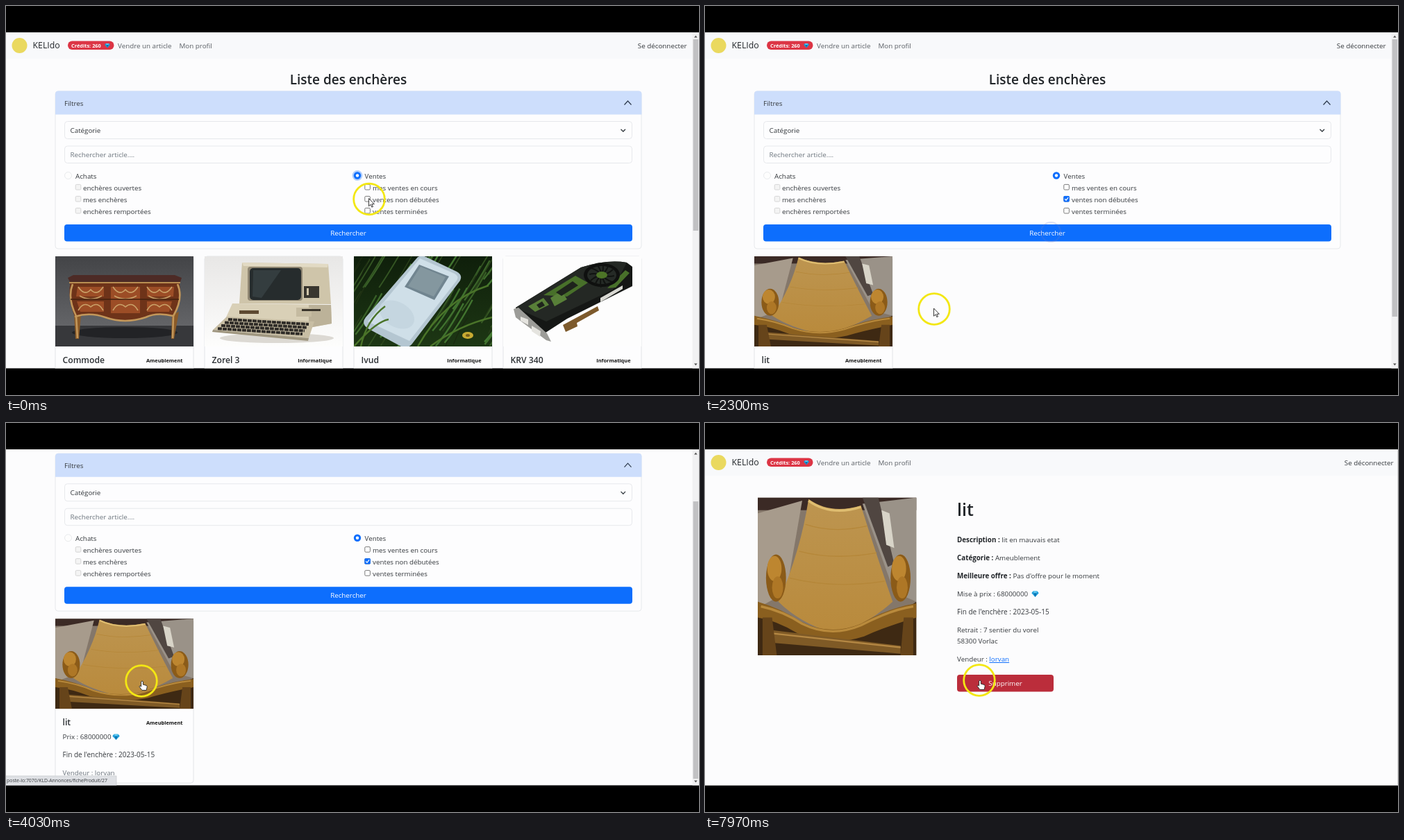
An HTML page for the animation above (8 s loop, 998 by 561 pixels).

```html
<!DOCTYPE html>
<html lang="fr">
<head>
<meta charset="utf-8">
<title>Liste des enchères</title>
<style>
html, body { margin: 0; width: 100%; height: 100%; overflow: hidden; background: #000; }
svg { display: block; }
#stage { width: 100vw; height: 100vh; }
text { font: 9.8px "Open Sans", "Noto Sans", sans-serif; fill: #35393d; white-space: pre; }
.h { font-weight: 600; fill: #212529; }
.t { font-size: 12.2px; font-weight: 600; fill: #2b2f33; }
.tag { font-size: 7.4px; font-weight: 700; fill: #111; text-anchor: end; }
.mute { fill: #6c757d; }
.mid { fill: #fff; text-anchor: middle; }
.b { font-weight: 700; fill: #212529; }
</style>
</head>
<body>
<svg id="stage" viewBox="0 0 998 561"></svg>
<script>
const LOOP = 8000;
const T = { check: 900, search: 1800, results: 2000, open: 4250, detail: 4550 };

const text = (x, y, s, cls = '', extra = '') => `<text x="${x}" y="${y}" class="${cls}" ${extra}>${s}</text>`;
const rect = (x, y, w, h, fill, extra = '') => `<rect x="${x}" y="${y}" width="${w}" height="${h}" fill="${fill}" ${extra}/>`;
const path = (d, fill, extra = '') => `<path d="${d}" fill="${fill}" ${extra}/>`;
const line = (d, color, w, extra = '') => path(d, 'none', `stroke="${color}" stroke-width="${w}" ${extra}`);
const oval = (x, y, rx, ry, fill, extra = '') => `<ellipse cx="${x}" cy="${y}" rx="${rx}" ry="${ry}" fill="${fill}" ${extra}/>`;
const fade = (id, a, b) => `<linearGradient id="${id}" x2="0" y2="1"><stop stop-color="${a}"/><stop offset="1" stop-color="${b}"/></linearGradient>`;
const pic = (x, y, w, h, box, body) =>
  `<svg x="${x}" y="${y}" width="${w}" height="${h}" viewBox="0 0 ${box}" preserveAspectRatio="none">${body}</svg>`;
const gem = (x, y, k = 1) => `<g transform="translate(${x} ${y}) scale(${k})">` +
  path('M-3-4H3L5.2-1.2 0 4.4-5.2-1.2Z', '#1b9bd8') + path('M-2-1.2H2L0 4.4Z', '#0b6fae') +
  path('M-3-4H3L2-1.2H-2Z', '#5cc6ee') + '</g>';

let seed = 7;
const rnd = () => (seed = seed * 16807 % 2147483647) / 2147483647;

// Pictures
function chest() {
  let s = rect(0, 0, 199, 130, 'url(#studio)') + rect(0, 100, 199, 30, '#37383b');
  s += oval(100, 110, 76, 8, '#222326');
  s += path('M27 82 29 119H34L37 84ZM168 84 167 119H171L178 80Z', '#8a5a28');
  s += path('M22 36H178Q184 58 170 86Q142 80 130 87Q100 97 72 87Q50 81 28 87Q17 60 22 36Z', '#6e3319');
  s += path('M32 44H70V58H30ZM132 44H171L170 58H132ZM80 44H122V82H80ZM31 65H70V80H36ZM132 65H168L164 80H132Z', '#9c4d26');
  s += path('M18 31 26 27H172L182 31 180 37H21Z', '#4d2b26') + line('M20 38H180', '#b98e52', 2);
  s += line('M25 40Q17 60 30 86L32 118M176 40Q185 60 170 86L169 118M28 87Q50 80 72 88Q100 98 130 88Q146 80 170 86', '#c3975a', 2.6);
  for (const x of [51, 101, 150])
    s += line(`M${x - 18} 44q9 14 18 4q9 10 18-4M${x - 18} 78q8-14 18-5q10-9 18 5M${x - 16} 57q16 9 32 0`, '#c9a168', 1.6);
  return s + line('M22 62H178', '#41200f', 1.4);
}

function computer() {
  let s = rect(0, 0, 199, 130, 'url(#wall)');
  s += oval(104, 118, 82, 7, '#dcd9d3');
  s += path('M54 9 178 11 182 69 50 68Z', '#cfc5aa') + path('M54 9 178 11 177 16 56 14Z', '#e2dac4');
  s += rect(62, 15, 79, 49, '#8f8672', 'rx="4"') + rect(65, 17, 74, 46, '#262c2d', 'rx="5"');
  s += path('M70 20 110 20 82 60 69 58Z', '#343d3f') + rect(143, 43, 22, 17, '#39362f') + rect(147, 46, 3, 10, '#cfc5aa');
  s += path('M40 68 182 70 183 97 146 104 30 90Z', '#d9d0b7') + path('M150 70 182 70 183 97 150 103Z', '#bcb299');
  s += rect(132, 74, 22, 13, '#c5bba1') + rect(140, 76, 27, 3, '#3a352b') + rect(50, 78, 28, 5, '#5d4931');
  s += path('M32 87 158 94 150 118 12 106Z', '#c8bea4') + path('M12 106 150 118 149 122 11 109Z', '#9f967f');
  for (let i = 0; i < 4; i++)
    s += line(`M${34 - i * 5} ${91 + i * 4.4}L${150 - i * 3} ${98 + i * 4.7}`, '#2f2c28', 4, 'stroke-dasharray="6 1"');
  return s;
}

function player() {
  let s = rect(0, 0, 199, 130, 'url(#lawn)');
  for (let i = 0; i < 80; i++) {
    const x = rnd() * 230 - 15, y = rnd() * 120 + 20, k = rnd();
    s += line(`M${x} ${y}q${8 + k * 12}-22 ${20 + k * 22}-${38 + k * 26}`, `hsl(${92 + k * 14} 42% ${10 + k * 24}%)`, 1 + k * 1.6);
  }
  s += path('M92 1Q98-2 104 1L148 22Q157 27 153 35L84 126Q78 134 68 130L20 104Q10 97 17 88Z', '#b4c6d1');
  s += path('M95 3 145 25Q152 29 148 35L80 122 20 94Z', '#cfdfe8');
  s += path('M94 12 137 29 116 63 73 44Z', '#718590') + path('M96 15 132 30 115 58 78 43Z', '#84979f');
  s += oval(62, 84, 27, 18, '#c5d6e0', 'transform="rotate(30 62 84)"');
  s += line('M0 130Q32 94 50 91M10 130Q18 92 45 72M92 130Q130 62 194 42M110 130Q150 100 199 88', '#4a7429', 2.4);
  return s + oval(164, 114, 8, 5, '#c7ab32') + oval(164, 114, 3, 2, '#775f1b');
}

function card() {
  let s = rect(0, 0, 199, 130, '#fdfdfd');
  s += path('M86 99 136 72 138 78 106 96 107 101 90 109Z', '#7d5a2c');
  s += path('M18 74 112 16Q150 4 178 9L186 15V43L92 90 58 112 24 92Z', '#151715');
  s += path('M18 74 112 16Q150 4 178 9L158 48 62 94Z', '#242824');
  s += path('M58 56 104 28 122 38 92 58ZM150 46 176 20 182 24 162 45Z', '#48702a');
  s += path('M36 72 58 60 66 70 46 80ZM68 60 84 50 92 62 74 72Z', '#587f38');
  s += path('M76 52 100 36 108 42 84 57ZM48 70 56 65 60 71 52 75Z', '#1e231c');
  s += oval(142, 27, 26, 17, '#0f100f') + oval(142, 27, 21, 13, '#252a26');
  for (let a = 0; a < 360; a += 30) s += line('M142 27q10-2 16-8', '#111311', 2, `transform="rotate(${a} 142 27)"`);
  s += oval(142, 27, 8, 5, '#4d7427') + path('M140 60 172 42V47L140 66Z', '#d8d8d2');
  s += path('M15 76 22 74 63 111 69 123 62 121 18 88Z', '#9c9c98');
  return s + path('M25 87 36 91 36 99 25 93ZM41 100 54 108 53 116 41 108Z', '#e5e4df');
}

function bed() {
  let s = rect(0, 0, 100, 100, '#84776a') + rect(0, 0, 100, 8, '#3b2a25');
  s += path('M0 10 28 2 18 60 0 70Z', '#a79b8c') + path('M66 4 100 0V66L86 60Z', '#9a9288');
  s += path('M66 0H76L86 42 82 44Z', '#504641') + path('M78 8 83 10 86 32 81 30Z', '#d8d4c8');
  s += path('M0 66Q44 104 100 66V100H0Z', '#3e2913');
  s += path('M32 1Q46 11 65 5Q74 34 85 66Q65 84 47 86Q26 79 13 66Q27 34 32 1Z', 'url(#gold)');
  s += line('M32 2Q46 12 65 6', '#dfbd70', 1.5) + line('M30 17Q48 23 69 18M26 34Q48 40 75 35M20 51Q48 58 80 53', '#b58739', .6);
  s += path('M0 66Q14 70 28 79Q46 88 65 80Q82 70 100 67V76Q80 82 67 88Q45 95 25 86Q12 78 0 76Z', '#8a5f1f');
  s += line('M2 69Q16 72 28 80Q46 89 65 81Q84 71 98 69', '#b98a3c', 1.5);
  s += path('M8 84 90 94V99L8 92Z', '#7f5a26') + line('M8 86 90 95', '#b58844', 1);
  s += path('M3 76H9L12 100H3ZM92 76H98V100H90Z', '#66441a');
  for (const x of [11.5, 90])
    s += oval(x, 51, 6.3, 15, '#8b5b18') + oval(x - 1, 45, 4.5, 8, '#bd8630') + oval(x + 1, 57, 3.5, 7, '#ae7726');
  return s;
}

// Page pieces
const nav = right => rect(0, 38, 998, 38, '#f8f9fb') + '<circle cx="19.5" cy="57" r="11" fill="#ead95f"/>' +
  text(38.5, 61, 'KELIdo', '', 'style="font-size:12.3px;fill:#212529"') +
  rect(89, 50.5, 66.5, 12.5, '#dc3545', 'rx="6.2"') +
  text(94, 59.6, 'Crédits: 260', '', 'style="font-size:7.4px;font-weight:700;fill:#fff"') + gem(146, 57, .75) +
  text(161, 60.5, 'Vendre un article', '', 'style="fill:#5b6066"') + text(249.5, 60.5, 'Mon profil', '', 'style="fill:#5b6066"') +
  text(right, 60.5, 'Se déconnecter', '', 'text-anchor="end"');

const box = (x, y, off) => rect(x, y, 7.6, 7.6, off ? '#f4f4f4' : '#fff', `rx="1.4" stroke="${off ? '#d2d2d2' : '#6d6d6d'}" stroke-width=".9"`);

function filters() {
  const edge = 'rx="4" stroke="#e1e4e8" stroke-width=".8"';
  let s = text(493, 112.5, 'Liste des enchères', 'h', 'text-anchor="middle" style="font-size:19px"');
  s += rect(71, 123, 844, 227, '#fdfdfe', edge) + path('M71 156.5V127q0-4.5 4.5-4.5H911q4.5 0 4.5 4.5V156.5Z', '#cddefc');
  s += text(84, 143.5, 'Filtres') + line('M890.5 142.5 895.5 137 900.5 142.5', '#2e3a4d', 1.2);
  s += rect(84.5, 166.5, 817, 25, '#fdfdfe', edge) + text(92.5, 183, 'Catégorie');
  s += line('M885.5 177.7 888.8 181 892 177.7', '#343a40', 1.3);
  s += rect(84.5, 202, 817, 24.5, '#fdfdfe', edge) + text(92.5, 218, 'Rechercher article....', 'mute');
  s += '<circle cx="89.5" cy="244.5" r="5" fill="#fdfdfd" stroke="#e3e5e8" stroke-width=".8"/>' + text(100, 248.5, 'Achats');
  s += '<circle id="focus" cx="506" cy="244.5" r="7.4" fill="#b0cefd"/>' +
    '<circle cx="506" cy="244.5" r="5.2" fill="#0d6efd"/><circle cx="506" cy="244.5" r="2.2" fill="#fff"/>' + text(516.5, 248.5, 'Ventes');
  const rows = [['enchères ouvertes', 'mes ventes en cours'], ['mes enchères', 'ventes non débutées'], ['enchères remportées', 'ventes terminées']];
  rows.forEach(([a, b], i) => {
    const y = 265.6 + i * 17;
    s += box(100.2, y - 8.2, true) + text(111, y, a) + box(516.8, y - 8.2) + text(528, y, b);
  });
  s += '<g id="tick">' + rect(516.4, 274, 8.4, 8.4, '#0d6efd', 'rx="1.4"') + line('M518.2 278.2 520 280.2 523.2 276', '#fff', 1.2) + '</g>';
  return s + rect(84, 315, 818, 24.5, '#0d6efd', 'rx="4"') + text(493, 331, 'Rechercher', 'mid');
}

function item(i, title, tag, art) {
  const x = 71 + 215 * i;
  return rect(x, 361, 199, 237, '#fdfdfe', 'rx="4" stroke="#dcdfe3" stroke-width=".8"') + art(x) +
    text(x + 10.5, 515, title, 't') + text(x + 183.5, 514, tag, 'tag');
}
const photo = draw => x => pic(x, 361, 199, 130, '199 130', draw());
const bedArt = x => pic(x, 361, 199, 130, '100 100', bed());

const results = () => item(0, 'lit', 'Ameublement', bedArt) + text(81.5, 535, 'Prix : 68000000') + gem(158.5, 531.5) +
  text(81.5, 561, "Fin de l'enchère : 2023-05-15", '', 'style="font-size:10px"') + text(81.5, 587, 'Vendeur : lorvan', 'mute');

function detail() {
  const field = (y, label, value) => text(363, y, `<tspan class="b">${label} :</tspan> ${value}`);
  return rect(0, 38, 998, 485, '#fcfcfd') + nav(991.5) + line('M997.5 38V523', '#dcdcdc', 1) +
    pic(76, 107.5, 228.5, 227.5, '100 100', bed()) +
    text(363, 133.5, 'lit', 'h', 'style="font-size:25px"') +
    field(172, 'Description', 'lit en mauvais etat') + field(198, 'Catégorie', 'Ameublement') +
    field(224, 'Meilleure offre', "Pas d'offre pour le moment") +
    text(363, 250, 'Mise à prix : 68000000') + gem(475.5, 246.5) +
    text(363, 276, "Fin de l'enchère : 2023-05-15", '', 'style="font-size:10px"') +
    text(363, 302, 'Retrait : 7 sentier du vorel') + text(363, 317.8, '58300 Vorlac') +
    text(363, 344, 'Vendeur : <tspan fill="#0d6efd" text-decoration="underline">lorvan</tspan>') +
    rect(363, 363, 139, 24.5, '#dc3545', 'rx="4" id="del"') + text(432.5, 379, 'Supprimer', 'mid');
}

const stage = document.getElementById('stage');
stage.innerHTML = '<defs>' + fade('studio', '#434447', '#6d6e71') + fade('wall', '#e8e7e6', '#fdfdfc') +
  fade('lawn', '#0f1f0b', '#1d3714') + fade('gold', '#bd9550', '#b98a3c') + '</defs>' + rect(0, 0, 998, 561, '#000') +
  '<svg y="38" width="998" height="484.6" viewBox="0 38 998 484.6">' + rect(0, 38, 998, 485, '#fcfcfd') +
  '<g id="list">' + nav(980.5) + filters() +
  '<g id="all">' + item(0, 'Commode', 'Ameublement', photo(chest)) + item(1, 'Zorel 3', 'Informatique', photo(computer)) +
  item(2, 'Ivud', 'Informatique', photo(player)) + item(3, 'KRV 340', 'Informatique', photo(card)) + '</g>' +
  '<g id="found">' + results() + '</g></g>' +
  '<g id="bar">' + rect(988.5, 38, 9.5, 485, '#f1f1f2') + rect(989.5, 48, 7.5, 400, '#c1c1c3', 'id="thumb"') +
  path('M991 45.5 993.3 42.5 995.6 45.5Z', '#555') + path('M991 515.5 993.3 518.5 995.6 515.5Z', '#555') + '</g>' +
  '<g id="status">' + rect(-1, 509, 160, 14, '#dfe1e5', 'stroke="#c6c8cc" stroke-width=".7"') +
  text(1, 518.2, 'poste-lo:7070/KLD-Annonces/ficheProduit/27', '', 'style="font-size:6.9px"') + '</g>' +
  '<g id="detail">' + detail() + '</g>' +
  '<circle id="ripple" fill="none" stroke="#7479c4" stroke-width="2.2"/>' +
  '<g id="mouse"><circle id="halo" r="22.3" fill="none" stroke="#f3e713" stroke-width="2.8"/>' +
  path('M-.5-1V10.2L2.1 7.8 3.8 11.6 5.5 10.9 3.8 7.2H7.3Z', '#fff', 'id="arrow" stroke="#222" stroke-width=".9"') +
  path('M-.4 1Q1-.8 2.4 1V5.2L7 6.4Q8.4 7 8.2 8.6L7.2 13.4H.8L-3 8.2Q-2.6 6.4-1.2 7.4L-.4 8.2Z', '#fff', 'id="hand" stroke="#222" stroke-width=".9"') +
  '</g></svg>';

const $ = {};
stage.querySelectorAll('[id]').forEach(e => $[e.id] = e);
const set = (e, o) => { for (const k in o) e.setAttribute(k, o[k]); };
const show = (e, on) => e.setAttribute('visibility', on ? 'inherit' : 'hidden');
const ramp = (t, a, b) => Math.min(1, Math.max(0, (t - a) / (b - a)));
const smooth = p => p * p * (3 - 2 * p);

// Pointer moves: start, end, x, y
const home = [523, 278.5];
const moves = [[980, 1400, 498, 327], [1960, 2280, 330, 437], [2450, 2750, 327, 440],
  [3200, 3750, 195, 372], [4950, 5600, 350, 326], [7050, 7650, 395, 371]];
const clicks = [[T.check, 521.5, 278], [T.search, 498, 326], [T.open, 195, 372]];

function pointer(t) {
  let [x, y] = home;
  for (const [a, b, nx, ny] of moves) {
    const p = smooth(ramp(t, a, b));
    x += (nx - x) * p;
    y += (ny - y) * p;
  }
  return [x, y];
}

function draw(t) {
  const [x, y] = pointer(t);
  const inside = (l, top, r, bottom) => x >= l && x <= r && y >= top && y <= bottom;
  const scroll = 78.8 * (1 - (1 - ramp(t, 2450, 2900)) ** 2);
  const found = t >= T.results, open = t >= T.detail;
  const onCard = found && !open && inside(71, 361 - scroll, 270, 522);
  const onDelete = open && inside(363, 363, 502, 387);
  const hand = onCard || onDelete || (!open && inside(84, 314 - scroll, 902, 340 - scroll));

  set($.list, { transform: `translate(0 ${-scroll})` });
  set($.thumb, { y: 48 + scroll * .826, height: found ? 400 : 276 });
  show($.focus, t < T.check);
  show($.tick, t >= T.check);
  show($.all, !found);
  show($.found, found);
  show($.list, !open);
  show($.bar, !open);
  show($.detail, open);
  show($.status, onCard);
  set($.del, { fill: onDelete ? '#bb2d3b' : '#dc3545' });

  const hit = clicks.find(([c]) => t >= c && t < c + 700);
  show($.ripple, hit);
  if (hit) {
    const p = (t - hit[0]) / 700;
    set($.ripple, { cx: hit[1], cy: hit[2], r: 4 + 14 * p, opacity: .8 * (1 - p) });
  }
  set($.mouse, { transform: `translate(${x} ${y})` });
  set($.halo, { opacity: 1 - ramp(t, 5900, 6200) + ramp(t, 7000, 7200) });
  show($.arrow, !hand);
  show($.hand, hand);
}

const start = performance.now();
function tick() {
  const t = (performance.now() - start) % LOOP;
  draw(t);
  requestAnimationFrame(tick);
}
draw(0);
tick();
</script>
</body>
</html>
```
